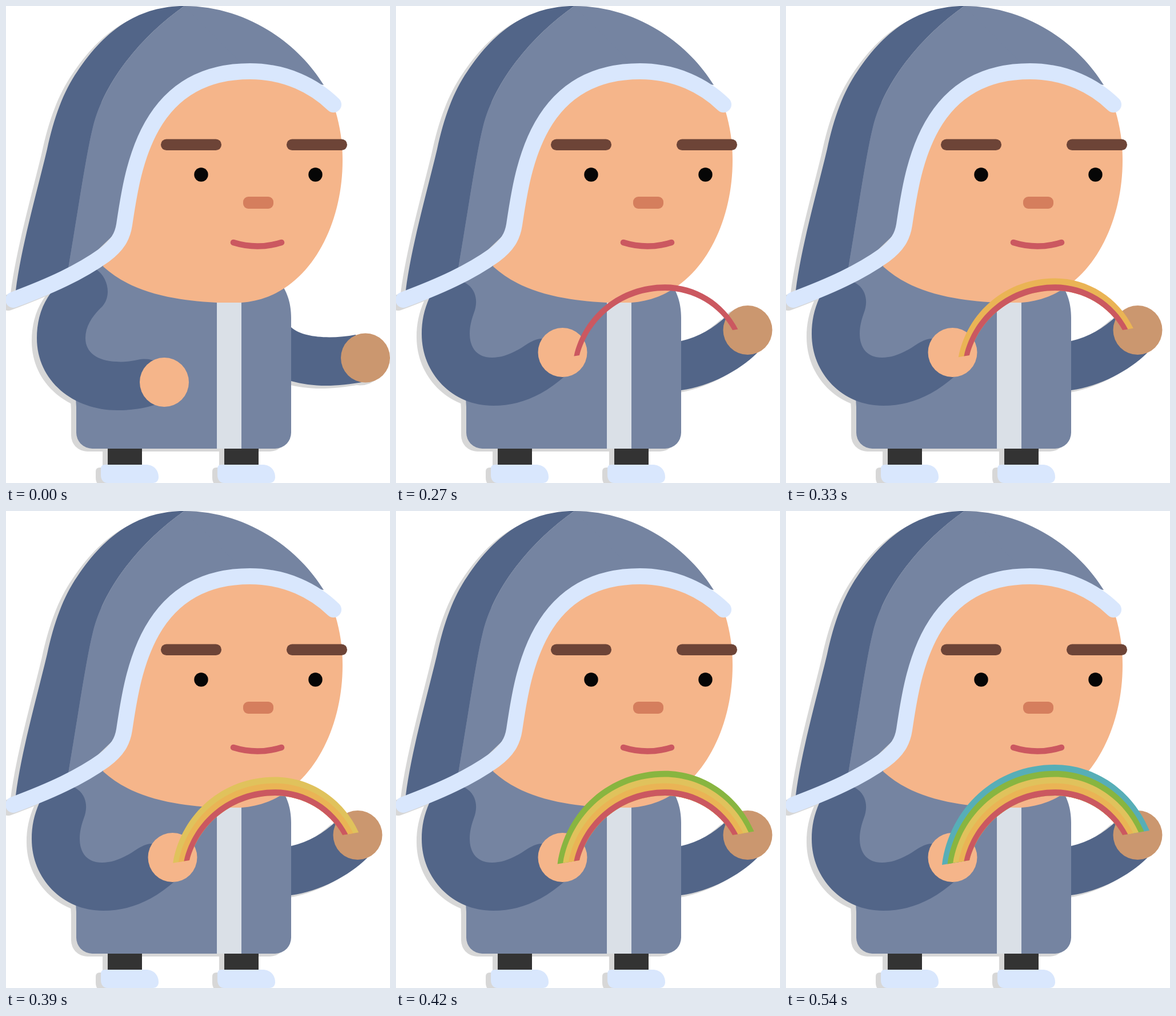
These frames come from a looping animation (672 px wide and 833 px high, 0.6 s). An HTML page:

```html
<!DOCTYPE html>
<html lang="en">
<head>
<meta charset="utf-8">
<title>Rainbow hands</title>
<style>
  html, body { margin: 0; height: 100%; overflow: hidden; background: #fff; }
  svg { display: block; width: 100vw; height: 100vh; }
  .figure { filter: drop-shadow(-9px 5px 0 #d7d7d7); }
  .cloth { fill: #7584a1; }
  .dark { fill: #526588; }
  .skin { fill: #f5b58a; }
  .tan { fill: #cb976f; }
  .pale { fill: #d9e7fd; }
  .line { fill: none; stroke-linecap: round; }
</style>
</head>
<body>
<svg viewBox="0 0 672 833">
  <defs>
    <g id="leg">
      <path fill="#333" d="M178 765h60v40h-60z"/>
      <path class="pale" d="M173 801H245C259 801 267 811 267 823C267 829 263 833 257 833H178C170 833 166 827 166 819V808Q166 801 173 801Z"/>
    </g>
  </defs>

  <g class="figure">
    <use href="#leg"/>
    <use href="#leg" x="204"/>

    <g class="open">
      <path class="dark" d="M480 540L499 561C520 580 570 582 612 574L628 656C575 666 535 665 499 655H480Z"/>
      <circle class="tan" cx="629" cy="614.5" r="43"/>
    </g>
    <g class="holding">
      <path class="dark" d="M485 587L499 585C530 578 555 563 578 542L632 606C600 637 550 664 499 671H480Z"/>
      <circle class="tan" cx="615.5" cy="566" r="43"/>
    </g>

    <path class="cloth" d="M180 445L110 480L123 700V745A28 28 0 0 0 151 773H471A28 28 0 0 0 499 745V545C499 523 494 506 486 492L440 470Z"/>
    <path fill="#dae0e7" d="M369 500h43v273h-43z"/>

    <g class="open">
      <path class="dark" d="M80 499C61 523 54 552 54 580C54 655 118 706 195 706C220 706 240 703 262 696L265 622C255 617 245 615 230 618C215 621 203 622 193 621C160 620 139 605 139 580C139 560 150 543 165 528C186 510 180 475 158 460Z"/>
      <circle class="skin" cx="277" cy="657" r="43"/>
    </g>
    <g class="holding">
      <path class="dark" d="M60 506C49 530 45 550 45 573C45 642 99 698 170 698C215 698 255 682 296 646L262 581C250 580 242 583 230 590C205 607 187 614 168 614C142 614 129 597 129 572C129 560 132 548 136 537C146 512 137 490 118 482Z"/>
      <circle class="skin" cx="291.5" cy="605" r="43"/>
    </g>

    <path class="cloth" d="M312 0C418 0 509 62 556 138L427 114L207 382L109 475L100 458L140 200Z"/>
    <path class="dark" d="M17 497C27 420 52 333 72 250C84 195 100 150 125 114C168 50 225 0 312 0C240 50 172 130 152 212C139 265 125 365 109 458V470L17 510Z"/>
    <path class="cloth" d="M312 0C240 50 172 130 152 212C139 265 125 365 109 458V470L207 382L427 114Z"/>
    <path class="skin" d="M573 172C584 205 589 235 589 270C589 390 525 510 412 518H369C275 513 215 495 170 455L172 435C195 418 204 402 207 382C221 290 243 114 427 114C490 114 540 140 573 172Z"/>
    <path class="line" stroke="#d9e7fd" stroke-width="28" d="M13 513C80 488 130 465 172 435C195 418 204 402 207 382C221 290 243 114 427 114C490 114 540 140 573 172"/>

    <g fill="#6d4437">
      <rect x="271" y="232.5" width="106" height="19.5" rx="9.7"/>
      <rect x="491" y="232.5" width="106" height="19.5" rx="9.7"/>
    </g>
    <g fill="#060606">
      <circle cx="341.5" cy="294.5" r="12.2"/>
      <circle cx="541.5" cy="294.5" r="12.2"/>
    </g>
    <rect fill="#d57e5d" x="415" y="333" width="53" height="21" rx="9"/>
    <path class="line" stroke="#cb5860" stroke-width="10.5" d="M398 413Q440 426 482 413"/>
  </g>

  <g id="rainbow"></g>
</svg>

<script>
  const LOOP = 600, GRAB = 270;
  const bands = [
    ['#cb5860', 270], ['#eab455', 330], ['#e0c25c', 390], ['#88b540', 420], ['#57aeb7', 450]
  ];
  // Bezier points of the rainbow's inner and outer edges
  const inner = [[321, 610], [338, 545], [398, 497], [471, 497], [520, 497], [566, 524], [589, 566]];
  const outer = [[273, 618], [286, 518], [367, 443], [470, 443], [542, 443], [607, 488], [636, 558]];
  const back = [...inner].reverse();

  // Each band reaches down to the inner edge and lies behind the previous one
  const rainbow = document.getElementById('rainbow');
  const arcs = bands.map(([color, start], i) => {
    const k = (i + 1) / bands.length;
    const edge = inner.map(([x, y], n) => [x + (outer[n][0] - x) * k, y + (outer[n][1] - y) * k]);
    const el = document.createElementNS('http://www.w3.org/2000/svg', 'path');
    el.setAttribute('d', `M${edge[0]}C${edge.slice(1)}L${back[0]}C${back.slice(1)}Z`);
    el.setAttribute('fill', color);
    rainbow.prepend(el);
    return { el, start };
  });

  const show = (el, on) => { el.style.display = on ? '' : 'none'; };
  const open = document.querySelectorAll('.open');
  const holding = document.querySelectorAll('.holding');

  function draw() {
    const t = performance.now() % LOOP;
    open.forEach(el => show(el, t < GRAB));
    holding.forEach(el => show(el, t >= GRAB));
    arcs.forEach(({ el, start }) => show(el, t >= start));
    requestAnimationFrame(draw);
  }
  draw();
</script>
</body>
</html>
```
